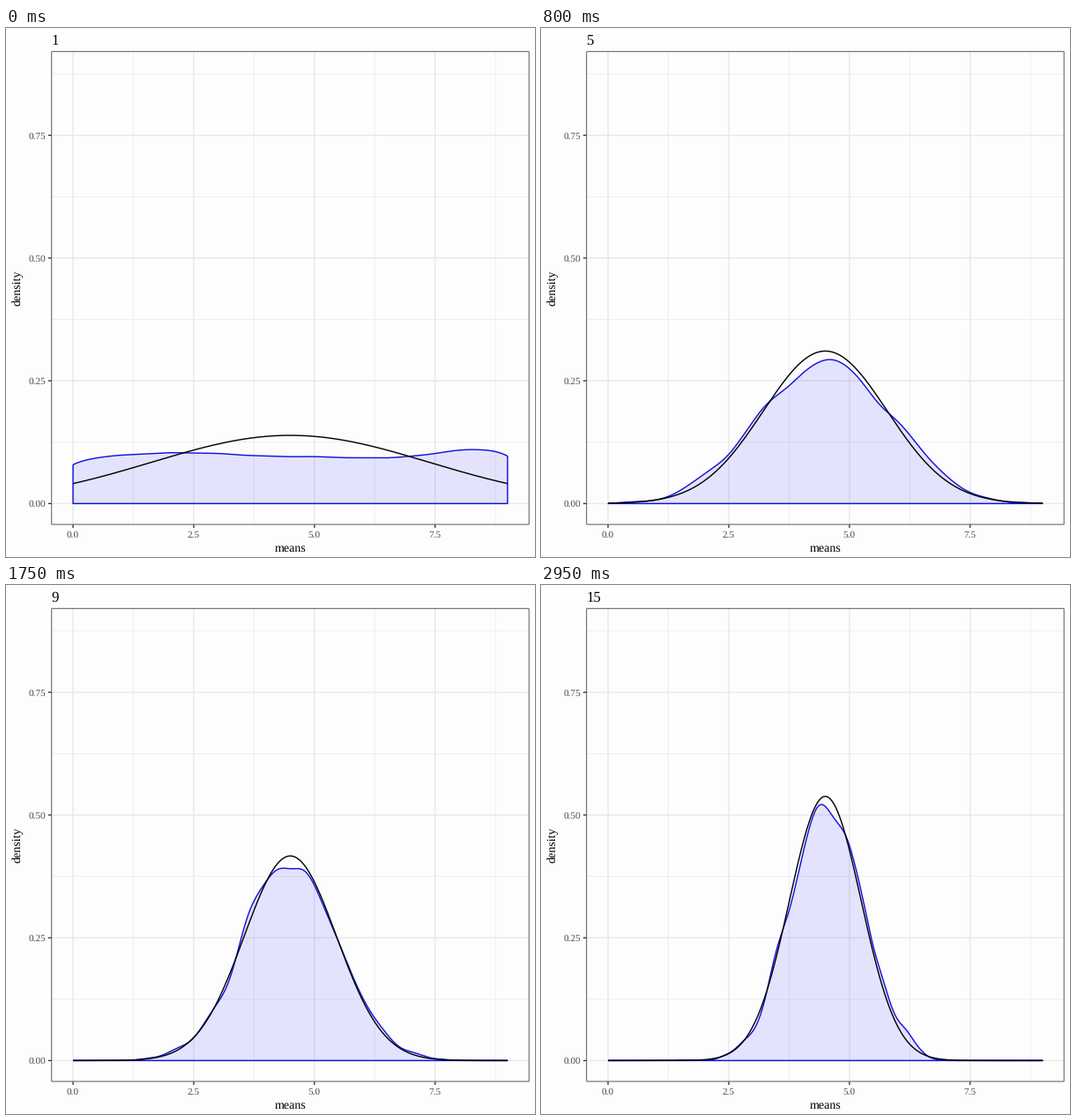
Animation of 600x600 px, one loop 3000 ms. Source, as a matplotlib script:

```python
import numpy as np
import matplotlib.pyplot as plt
from matplotlib.animation import FuncAnimation
from matplotlib.patches import Rectangle

SIZE, DPI = 600, 100
FRAMES, HOLD = 60, 4            # each sample size stays for four frames
PX = 72 / DPI                   # points per pixel

LEFT, RIGHT, TOP, BOTTOM = 51.4, 593.5, 26.4, 563.4
XS = (RIGHT - LEFT) / 9.9       # pixels per unit, with 5 % padding each side
X0 = LEFT + 0.45 * XS
Y0, YS = 539.4, 557.0
MEAN, SD = 4.5, np.sqrt(99 / 12)    # of the digits 0..9

PAPER, INK, GREY, BLUE = "#fdfdfd", "#333333", "#4d4d4d", "#1010dd"
plt.rcParams.update({"font.family": "Liberation Serif", "text.hinting": "none"})


def px(x):
    return X0 + XS * np.asarray(x)


def py(y):
    return Y0 - YS * np.asarray(y)


def bell(x, mid, sd):
    return np.exp(-0.5 * ((x - mid) / sd) ** 2) / (sd * np.sqrt(2 * np.pi))


def normal(x, n):
    return bell(x, MEAN, SD / np.sqrt(n))


def density(x, n, count=2000):
    """Kernel density of the means of n random digits."""
    means = np.random.default_rng(n).integers(0, 10, (count, n)).mean(axis=1)
    width = 0.9 * means.std() * count ** -0.2
    return bell(x[:, None], means, width).mean(axis=1)


fig = plt.figure(figsize=(SIZE / DPI, SIZE / DPI), dpi=DPI, facecolor=PAPER)
ax = fig.add_axes([0, 0, 1, 1])
ax.set_xlim(0, SIZE)
ax.set_ylim(SIZE, 0)
ax.axis("off")


def line(xs, ys, color, width, **kw):
    return ax.plot(xs, ys, color=color, lw=width * PX, solid_capstyle="butt",
                   snap=False, **kw)[0]


def label(x, y, text, size, color="black", **kw):
    return ax.text(x, y, text, fontsize=size * PX, color=color,
                   va="baseline", **kw)


def gridlines(xs, ys, width):
    for x in px(xs):
        line([x, x], [TOP, BOTTOM], "#e8e8e8", width, zorder=1)
    for y in py(ys):
        line([LEFT, RIGHT], [y, y], "#e8e8e8", width, zorder=1)


x_ticks, y_ticks = np.arange(0, 9, 2.5), np.arange(0, 0.9, 0.25)
gridlines(x_ticks + 1.25, y_ticks + 0.125, 0.68)
gridlines(x_ticks, y_ticks, 1.36)

for v in x_ticks:
    line([px(v)] * 2, [BOTTOM, BOTTOM + 3.5], INK, 1.36)
    label(px(v), 578, f"{v:.1f}", 11.2, GREY, ha="center")
for v in y_ticks:
    line([LEFT - 3.5, LEFT], [py(v)] * 2, INK, 1.36)
    label(45.2, py(v) + 3.8, f"{v:.2f}", 11.2, GREY, ha="right")

label((LEFT + RIGHT) / 2, 593.8, "means", 14, ha="center")
label(16.6, (TOP + BOTTOM) / 2, "density", 14, ha="center",
      rotation=90, rotation_mode="anchor")
title = label(LEFT, 18.6, "1", 16.8, ha="left")

area, = ax.fill([0], [0], color="#0000ff", alpha=0.1, lw=0, zorder=2)
outline = line([], [], BLUE, 1.42, zorder=3)
curve = line([], [], "black", 1.42, zorder=4)
ax.add_patch(Rectangle((LEFT + 0.35, TOP + 0.35), RIGHT - LEFT - 0.7,
                       BOTTOM - TOP - 0.7, fill=False, ec=INK, lw=0.8 * PX,
                       snap=False, zorder=5))

grid = np.linspace(0, 9, 512)
shapes = {n: density(grid, n) for n in range(1, FRAMES // HOLD + 1)}


def update(i):
    n = 1 + i // HOLD
    xs = px(np.concatenate([grid, [9, 0, 0]]))
    ys = py(np.concatenate([shapes[n], [0, 0, shapes[n][0]]]))
    area.set_xy(np.column_stack([xs, ys]))
    outline.set_data(xs, ys)
    curve.set_data(px(grid), py(normal(grid, n)))
    title.set_text(str(n))
    return area, outline, curve, title


anim = FuncAnimation(fig, update, frames=FRAMES, interval=50, repeat=True,
                     repeat_delay=0, blit=False)
plt.show()
```
